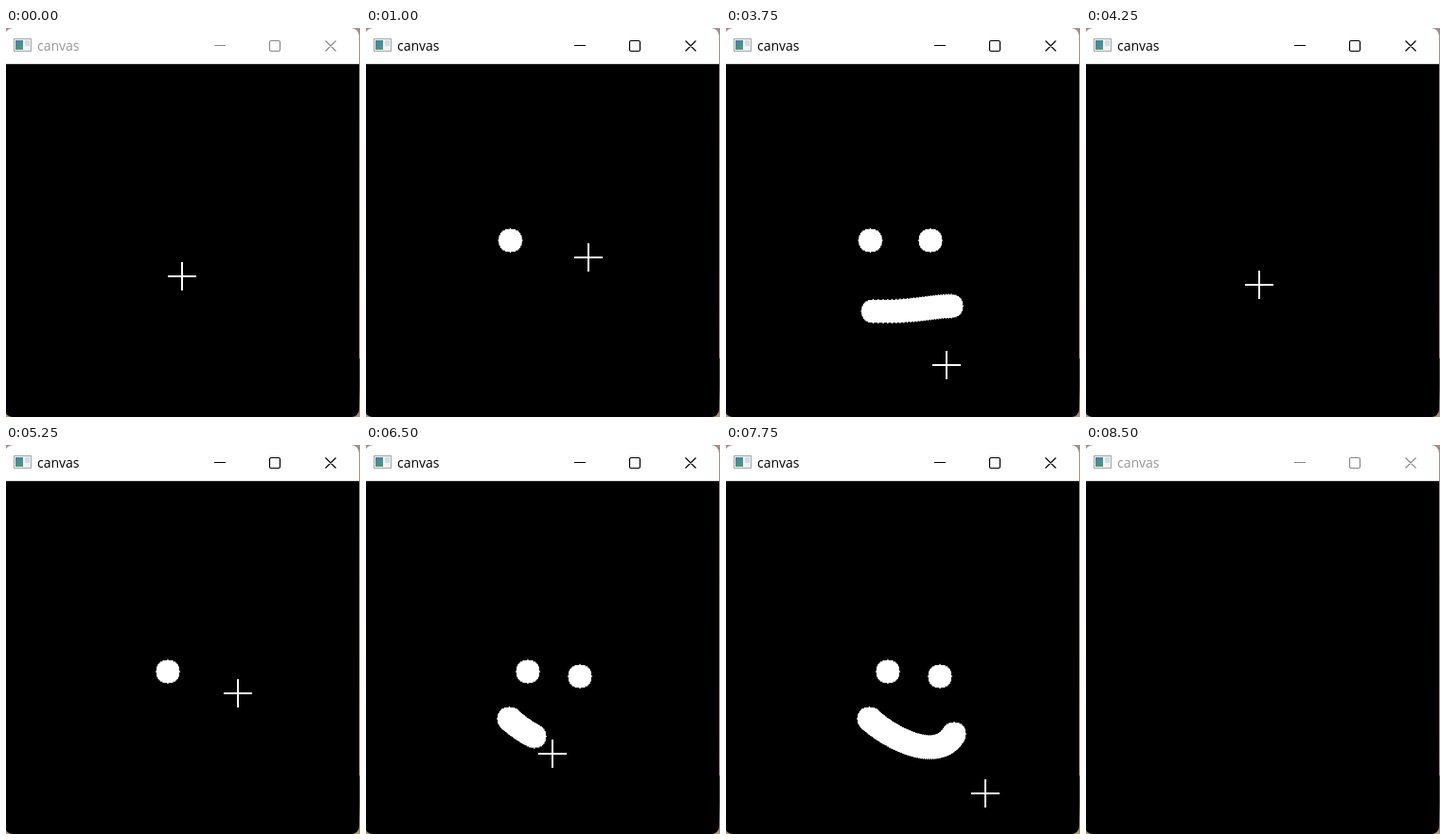
An HTML page with a canvas for the animation above (8.75 s loop, 374 by 412 pixels).

```html
<!DOCTYPE html>
<html lang="en">
<head>
<meta charset="utf-8">
<title>canvas</title>
<style>
html, body { margin: 0; width: 100%; height: 100%; overflow: hidden; background: #000; }
canvas { display: block; }
</style>
</head>
<body>
<canvas id="stage" width="374" height="412"></canvas>
<script>
const ctx = document.getElementById('stage').getContext('2d');
const STEP = 250, STEPS = 35;
const SCALE = 1.25, RADIUS = 10;
const OFFSET = { x: 19, y: 18 };  // pointer relative to the brush

// The script below fills these: brush travel and the dabs of paint it leaves
const segments = [], dabs = [];
let clock = 0, brush = [167, 245];

function bezier([a, b, c, d], t) {
  const u = 1 - t;
  return a.map((_, i) =>
    u * u * u * a[i] + 3 * u * u * t * b[i] + 3 * u * t * t * c[i] + t * t * t * d[i]);
}

function follow(until, curve) {
  segments.push({ from: clock, until, curve });
  clock = until;
  brush = curve[3];
}

function move(until, ...to) {
  const lerp = t => brush.map((v, i) => v + (to[i] - v) * t);
  follow(until, [brush, lerp(1 / 3), lerp(2 / 3), to]);
}

function dab(born, [x, y]) {
  dabs.push({ x, y, born, gone: Infinity });
}

function dot(at) {
  move(at, ...brush);
  dab(at, brush);
}

function drag(until, count, ...rest) {
  const start = clock, curve = [brush, ...rest];
  for (let i = 1; i <= count; i++) {
    const t = i / count;
    dab(start + (until - start) * t, bezier(curve, t));
  }
  follow(until, curve);
}

function wipe() {
  for (const d of dabs) d.gone = Math.min(d.gone, clock);
}

// First face
move(2, 152.5, 225); dot(2);
move(4, 216, 225); dot(5);
move(7, 155.5, 300); dot(8);
drag(11, 24, [200, 301], [215, 295], [238, 294.5]);
move(15, 214, 339);
move(16, 196, 302); wipe();

// Second face
move(18, 132, 205);
move(19, 171, 240); dot(19);
move(21, 226, 245); dot(22);
move(24, 151.5, 290); dot(24); dot(25);
drag(28, 45, [168, 306], [222, 339], [241, 306]);
move(29, 242, 304);
move(32, 261, 374); wipe();
move(33, 269, 412);

function brushAt(s) {
  const seg = segments.find(g => s < g.until) || segments[segments.length - 1];
  return bezier(seg.curve, Math.min(1, (s - seg.from) / (seg.until - seg.from)));
}

// Pixel disc enlarged by SCALE
function stamp({ x, y }) {
  for (let d = 0; d <= RADIUS; d++) {
    const w = Math.floor(Math.sqrt(RADIUS * RADIUS - d * d));
    const hw = (w + 0.5) * SCALE, hh = (d + 0.5) * SCALE;
    ctx.fillRect(x - hw, y - hh, 2 * hw, 2 * hh);
  }
}

function box(color, x, y, w, h) {
  ctx.fillStyle = color;
  ctx.fillRect(x, y, w, h);
}

function shade(x0, y0, x1, y1, ...colors) {
  const g = ctx.createLinearGradient(x0, y0, x1, y1);
  colors.forEach((c, i) => g.addColorStop(i / (colors.length - 1), c));
  return g;
}

function drawIcon() {
  box('#a4a8ab', 8, 11, 19, 14);
  box('#f0f2f3', 9, 12, 17, 12);
  box(shade(10, 13, 18, 23, '#4a7fa5', '#4f9c78'), 10, 13, 8, 10);
  box('#d5dbe0', 20, 13, 5, 6);
}

function drawTitle(active) {
  box('#fff', 0, 0, 374, 38.2);
  drawIcon();
  ctx.fillStyle = active ? '#000' : '#979797';
  ctx.font = '14px "Open Sans", "Noto Sans", sans-serif';
  ctx.fillText('canvas', 33, 24);
  ctx.strokeStyle = active ? '#000' : '#888';
  ctx.lineWidth = 1.2;
  ctx.beginPath();
  ctx.moveTo(220, 18.5);
  ctx.lineTo(232, 18.5);
  ctx.roundRect(278.5, 13.5, 11, 11, 1.5);
  ctx.moveTo(337.5, 13.5);
  ctx.lineTo(348.5, 24.5);
  ctx.moveTo(348.5, 13.5);
  ctx.lineTo(337.5, 24.5);
  ctx.stroke();
}

function drawPointer(s) {
  const [bx, by] = brushAt(s);
  const x = Math.round(bx + OFFSET.x), y = Math.round(by + OFFSET.y);
  box('#fff', x - 15, y - 1, 30, 2);
  box('#fff', x - 1, y - 15, 2, 30);
}

function drawDesktop() {
  box(shade(0, 0, 0, 350, '#a98c80', '#b3906a'), 0, 0, 374, 350);
  box(shade(0, 350, 0, 412, '#4a423c', '#4a423c', '#b3966c'), 0, 350, 374, 62);
}

function draw(s) {
  drawDesktop();
  ctx.save();
  ctx.beginPath();
  ctx.roundRect(-1, 0, 374, 412, 8);
  ctx.clip();
  box('#000', 0, 0, 374, 412);
  drawTitle(s >= 2 && s < 34);
  ctx.fillStyle = '#fff';
  dabs.filter(d => s >= d.born && s < d.gone).forEach(stamp);
  drawPointer(s);
  ctx.restore();
}

function tick(now) {
  draw(Math.floor(now / STEP) % STEPS);
  requestAnimationFrame(tick);
}
draw(0);
requestAnimationFrame(tick);
</script>
</body>
</html>
```
